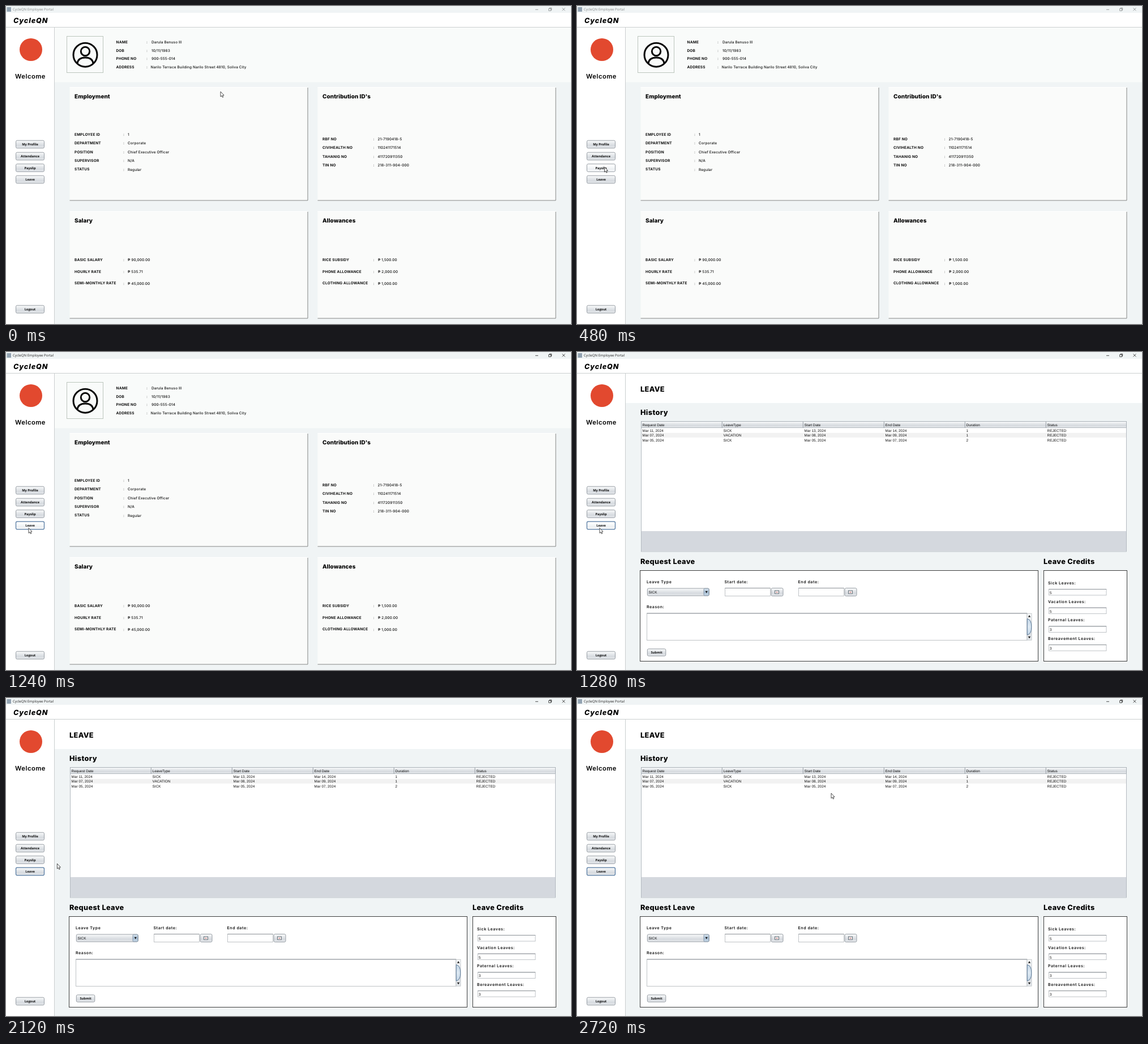
Recreate the animation shown at these times as an HTML page. Size 998x561 px, loop 3.44 s.

```html
<!DOCTYPE html>
<html lang="en">
<head>
<meta charset="utf-8">
<title>Employee Portal</title>
<style>
  html, body { margin: 0; width: 100%; height: 100%; overflow: hidden; background: #fff; }
  svg { display: block; width: 100vw; height: 100vh; }
  text { font-family: Inter, sans-serif; fill: #111; white-space: pre; text-rendering: geometricPrecision; }
  .window { font: 6.1px "Open Sans", sans-serif; fill: inherit; }
  .brand { font-size: 12.6px; font-weight: 800; font-style: italic; letter-spacing: .9px; fill: #000; }
  .welcome { font-size: 11.2px; font-weight: 600; letter-spacing: .5px; fill: #000; }
  .card { font-size: 10px; font-weight: 800; letter-spacing: .05px; fill: #000; }
  .head { font-size: 12.7px; font-weight: 800; letter-spacing: .36px; fill: #000; }
  .label { font-size: 6.5px; font-weight: 700; letter-spacing: .18px; }
  .value { font-size: 6.4px; font-weight: 500; letter-spacing: .13px; }
  .field { font-size: 7px; font-weight: 600; letter-spacing: .57px; }
  .cell { font: 6.4px "Liberation Sans", Arial, sans-serif; }
  .button { font: 700 5.7px "Open Sans", sans-serif; text-anchor: middle; }
</style>
</head>
<body>
<svg id="stage" viewBox="0 0 998 561"></svg>
<script>
const LOOP = 3440, STEP = 40;
const BUTTONS = [["My Profile", 244], ["Attendance", 265], ["Payslip", 285.5], ["Leave", 306], ["Logout", 535]];

// y is the middle of the capitals
const text = (x, y, string, style) =>
  `<text x="${x}" y="${y}" dy=".36em" class="${style}">${string}</text>`;
const rect = (x, y, w, h, fill, stroke = "none", extra = "") =>
  `<rect x="${x}" y="${y}" width="${w}" height="${h}" fill="${fill}" stroke="${stroke}" ${extra}/>`;
const path = (d, stroke, width = 1, fill = "none") =>
  `<path d="${d}" stroke="${stroke}" stroke-width="${width}" fill="${fill}"/>`;
const gradient = (id, ...colors) => `<linearGradient id="${id}" x2="0" y2="1">` +
  colors.map((c, i) => `<stop offset="${i / (colors.length - 1)}" stop-color="${c}"/>`).join("") + `</linearGradient>`;
const button = (x, y, w, h, label, id = "") =>
  rect(x, y - h / 2, w, h, "url(#metal)", "#8d949b", `rx="2.2" stroke-width=".9" id="${id}"`) +
  text(x + w / 2, y, label, "button");

function card(x, y, h, title, colonX, valueX, rows) {
  return rect(x, y, 421, h, "#fafbfa") +
    path(`M${x} ${y + .5}h420`, "#fff") +
    path(`M${x} ${y + h - .5}h420.5V${y + 1}`, "#747877", .9) +
    text(x + 8.5, y + 16, title, "card") +
    rows.map(([ly, label, value, vy = ly]) =>
      text(x + 8.5, ly, label, "label") + text(colonX, vy, ":", "value") + text(valueX, vy, value, "value")).join("");
}

function profilePage() {
  const person = [
    [64, "NAME", "Darula Benuso III", 257],
    [78.5, "DOB", "10/11/1983", 257],
    [93, "PHONE NO", "900-555-014", 257],
    [107.5, "ADDRESS", "Narilo Terrace Building Narilo Street 4810, Soliva City", 255.5]];
  return rect(86, 38, 912, 96.5, "#f9fbfa") +
    rect(107.5, 53.5, 64, 64, "#f9fbfa", "#bcc6bd") +
    `<g fill="none" stroke="#080808" stroke-width="3"><circle cx="140" cy="86.2" r="21"/>
     <circle cx="140" cy="80" r="7.7"/><path d="M126 101.5C127 93 133 91 140 91S153 93 154 101.5"/></g>` +
    person.map(([y, label, value, x]) =>
      text(194.5, y, label, "label") + text(248, y, ":", "value") + text(x, y, value, "value")).join("") +
    card(112.5, 143, 200.5, "Employment", 207, 215, [
      [226.5, "EMPLOYEE ID", "1"],
      [242, "DEPARTMENT", "Corporate"],
      [257.5, "POSITION", "Chief Executive Officer"],
      [273, "SUPERVISOR", "N/A"],
      [288, "STATUS", "Regular", 289]]) +
    card(550.5, 143, 200.5, "Contribution ID's", 648.5, 656.5, [
      [234.5, "RBF NO", "21-7190418-5"],
      [250, "CIVIHEALTH NO", "110241171514"],
      [265.5, "TAHANIG NO", "411720911350"],
      [280.5, "TIN NO", "218-311-904-000", 281]]) +
    card(112.5, 362, 189.5, "Salary", 207, 215, [
      [448, "BASIC SALARY", "₱ 90,000.00"],
      [468.5, "HOURLY RATE", "₱ 535.71"],
      [488.5, "SEMI-MONTHLY RATE", "₱ 45,000.00", 489.5]]) +
    card(550.5, 362, 189.5, "Allowances", 648.5, 657, [
      [448, "RICE SUBSIDY", "₱ 1,500.00"],
      [468.5, "PHONE ALLOWANCE", "₱ 2,000.00"],
      [488.5, "CLOTHING ALLOWANCE", "₱ 1,000.00", 489.5]]);
}

function historyTable() {
  const columnX = i => 113 + i * 143;
  const row = (y, cells) => cells.map((c, i) => text(columnX(i) + 2.6, y, c, "cell")).join("");
  return rect(113.5, 122.5, 857, 229.5, "#fff", "#a4abb2", `stroke-width=".8"`) +
    rect(114, 142.7, 856, 8.2, "#f2f2f2") +
    rect(114, 316, 856, 35.5, "#d4d8de") +
    rect(113.5, 122.5, 857, 11, "url(#metal)", "#a0a7ae", `stroke-width=".8"`) +
    [1, 2, 3, 4, 5].map(i => path(`M${columnX(i) + .3} 123v10.5`, "#858d95", .8)).join("") +
    row(128.3, ["Request Date", "LeaveType", "Start Date", "End Date", "Duration", "Status"]) +
    row(138.8, ["Mar 11, 2024", "SICK", "Mar 13, 2024", "Mar 14, 2024", "1", "REJECTED"]) +
    row(147.1, ["Mar 07, 2024", "VACATION", "Mar 08, 2024", "Mar 09, 2024", "1", "REJECTED"]) +
    row(155.4, ["Mar 05, 2024", "SICK", "Mar 05, 2024", "Mar 07, 2024", "2", "REJECTED"]);
}

function leavePage() {
  const panel = (x, w) => rect(x, 385.5, w, 160, "#fff", "#2b2b2b", `stroke-width=".9"`);
  const input = (x, y, w, h) => rect(x, y, w, h, "#fff", "#b0b5b9", `stroke-width=".8"`) +
    path(`M${x} ${y}h${w}`, "#858b90", .9);
  const dateField = (x, label) => text(x - .5, 405, label, "field") + input(x + .5, 416.5, 80, 14) +
    button(x + 82, 423.5, 21, 14, "") +
    rect(x + 88.5, 421, 7, 5.2, "#f4f4f4", "#566069", `stroke-width=".9"`) +
    path(`M${x + 90.5} 423.8h3`, "#c96a6a", 1.2);
  const credit = ([label, count], i) => {
    const y = 407.5 + i * 32.7;
    return text(832, y, label, "field") + input(833.5, y + 11, 101.5, 10.5) + text(835, y + 17, count, "cell");
  };
  return rect(86, 38, 912, 52, "#fff") + text(112, 65, "LEAVE", "head") +
    text(112, 106, "History", "head") + historyTable() +
    text(112, 369.5, "Request Leave", "head") + text(824, 369.5, "Leave Credits", "head") +
    panel(111.5, 703) + panel(824.5, 147) +
    text(123, 405, "Leave Type", "field") + button(124.3, 423.5, 109, 13, "") +
    rect(224, 417.2, 9, 12.6, "url(#blue)", "#6f8295", `rx="1.5" stroke-width=".7"`) +
    path("M226.6 421.8h4.2l-2.1 3.8z", "none", 0, "#111") + text(126.5, 423.8, "SICK", "cell") +
    dateField(261, "Start date:") + dateField(391, "End date:") +
    text(123, 449, "Reason:", "field") + input(123.5, 461, 671.5, 47.5) +
    rect(795, 461.2, 8, 47, "url(#metal)", "#b0b5b9", `stroke-width=".7"`) +
    path("M795.2 470.5Q803 472 802.7 485Q803 497.5 795.2 499z", "#4f6f8f", .9, "url(#thumb)") +
    path("M796.8 467.7h4.4l-2.2-3.8zM796.8 501.7h4.4l-2.2 3.8z", "none", 0, "#222") +
    button(124.3, 530, 32.5, 12.5, "Submit") +
    [["Sick Leaves:", 5], ["Vacation Leaves:", 5], ["Paternal Leaves:", 3], ["Bereavement Leaves:", 3]].map(credit).join("");
}

const stage = document.getElementById("stage");
stage.innerHTML = `<defs>
    ${gradient("metal", "#fbfcfc", "#e6e9ec", "#d6dadf", "#e8ebee")}
    ${gradient("hover", "#ffffff", "#f8fafb", "#eceff2", "#fafbfc")}
    ${gradient("pressed", "#aab4bf", "#b9c2cc", "#cdd4db")}
    ${gradient("blue", "#dbe6f0", "#a9c0d6", "#c6d7e6")}
    ${gradient("thumb", "#c3d5e6", "#dce8f2", "#c3d5e6")}
  </defs>` +
  rect(0, 0, 998, 561, "#f0f4f5") + rect(0, 12, 998, 26, "#fff") + rect(0, 38, 85, 523, "#fff") +
  `<g id="profile">${profilePage()}</g><g id="leave">${leavePage()}</g>` +
  path("M0 37.5h998M85.5 38v523", "#c6cacb", .9) +
  rect(1.5, 2, 7.5, 8, "#93a3b2") +
  `<g id="titleBar">${text(12, 6.3, "CycleQN Employee Portal", "window")}
    <path d="M935 6.3h5M958.7 4.6h3.8v3.8h-3.8zM960 4.4v-1h3.7v3.8h-1M982.5 3.3l5 5m0-5l-5 5" fill="none" stroke="currentColor" stroke-width=".8"/></g>` +
  text(13, 25, "CycleQN", "brand") +
  `<circle cx="44" cy="77" r="20" fill="#e2492f"/>` +
  text(16, 123.5, "Welcome", "welcome") +
  BUTTONS.map(([label, y]) => button(17.5, y, 50, 13.6, label, label)).join("") +
  `<circle id="ripple" cx="39.5" cy="311.5" fill="none" stroke="#a5d2c8" stroke-width=".8"/>
   <path id="cursor" d="M0 0V9L2 7.2L3.4 10.2L4.8 9.6L3.5 6.7L6 6.4Z" fill="#fff" stroke="#222" stroke-width=".8"/>`;

const part = id => document.getElementById(id);

// [time, x, y] of the pointer tip
const POINTER = [
  [0, 379, 151], [120, 328, 166], [240, 192, 212], [360, 95, 258], [480, 48.5, 284], [560, 41, 302], [640, 40, 310.5],
  [1960, 40, 310.5], [2080, 67, 300], [2240, 183, 262], [2400, 332, 213], [2520, 410, 174], [2600, 436, 170], [2720, 449, 168], [LOOP, 449, 168]];

function slope(i, axis) {
  const a = POINTER[i - 1], b = POINTER[i], c = POINTER[i + 1];
  if (!a || !c || a[axis] === b[axis] || b[axis] === c[axis]) return 0;
  return (c[axis] - a[axis]) / (c[0] - a[0]);
}

function pointerAt(time, axis) {
  const i = POINTER.findIndex(key => key[0] > time) - 1;
  const a = POINTER[i], b = POINTER[i + 1], span = b[0] - a[0], u = (time - a[0]) / span;
  const ease = u * u * (3 - 2 * u);
  return a[axis] + (b[axis] - a[axis]) * ease +
    span * u * (1 - u) * ((1 - u) * slope(i, axis) - u * slope(i + 1, axis));
}

function draw(time) {
  const x = pointerAt(time, 1), y = pointerAt(time, 2);
  const active = time >= 1160, onLeave = time >= 1280;
  part("cursor").setAttribute("transform", `translate(${x} ${y})`);
  part("profile").style.display = onLeave ? "none" : "";
  part("leave").style.display = onLeave ? "" : "none";
  part("titleBar").style.color = part("titleBar").style.fill = active ? "#222" : "#858889";

  for (const [label, by] of BUTTONS) {
    const hovered = x > 17 && x < 68 && Math.abs(y - by) < 7;
    const focused = active && label === "Leave";
    const fill = focused && time < 1240 ? "pressed" : hovered ? "hover" : "metal";
    part(label).setAttribute("fill", `url(#${fill})`);
    part(label).setAttribute("stroke", focused ? "#50769f" : "#8d949b");
    part(label).setAttribute("stroke-width", focused ? 1.2 : .9);
  }

  const spread = Math.min(1, Math.max(0, (time - 1280) / 280));
  part("ripple").setAttribute("r", 4 + 10 * spread);
  part("ripple").setAttribute("opacity", onLeave && time < 2000 ? .9 * spread * (1 - spread) + .15 * spread : 0);
}

function tick(now) {
  draw(Math.floor(now % LOOP / STEP) * STEP);
  requestAnimationFrame(tick);
}
draw(0);
requestAnimationFrame(tick);
</script>
</body>
</html>
```
